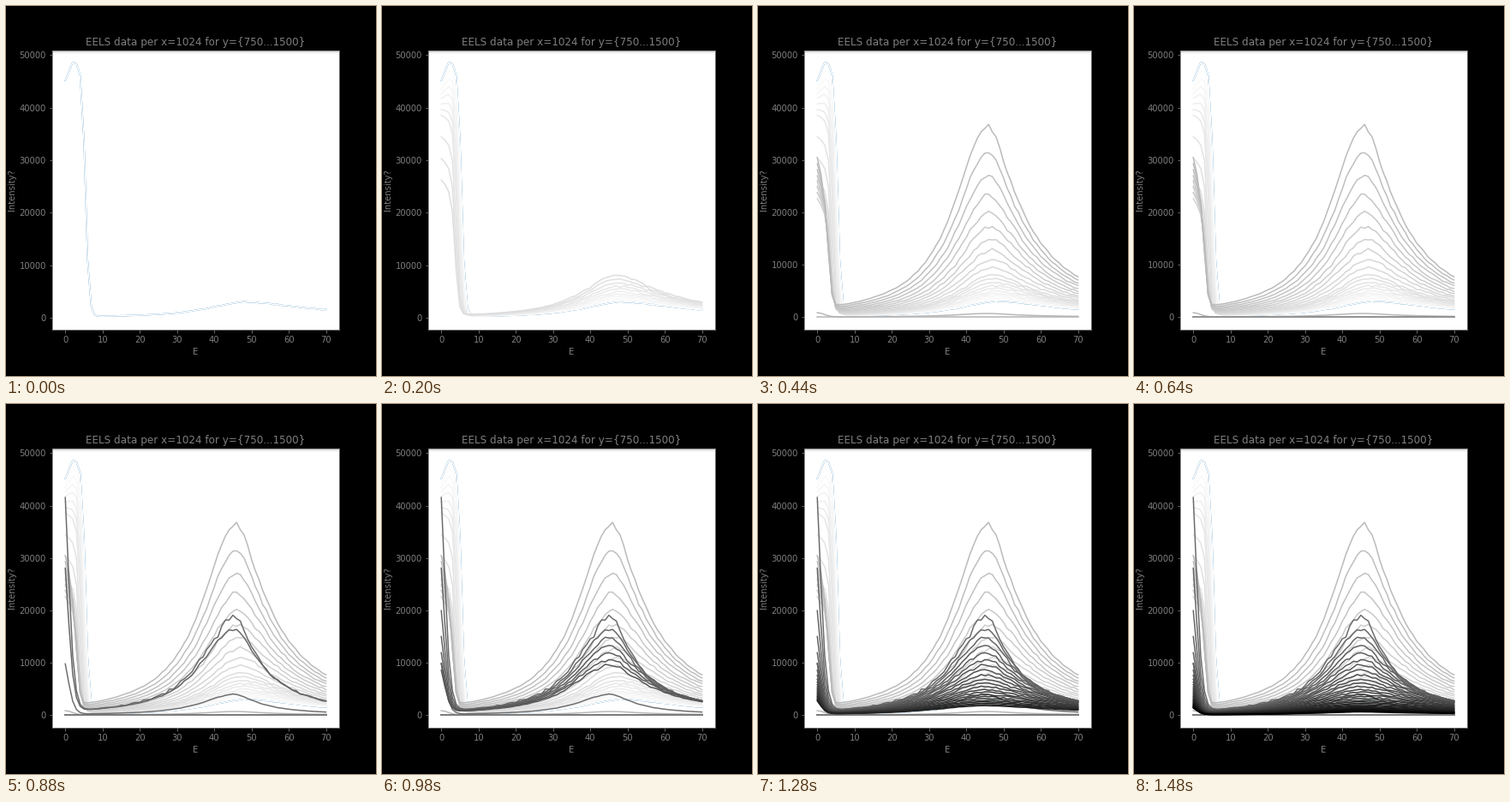
These frames come from a looping animation (432 by 432 pixels, 1500 ms). A matplotlib script:

```python
import matplotlib.pyplot as plt
import numpy as np
from matplotlib.animation import FuncAnimation

N = 75
GAP, BACK = 21, 42  # the signal fades out, then returns
TOP = 48480
GREY = "#7f7f7f"
E = np.arange(71)
rng = np.random.default_rng(4)


def mix(a, b, t):
    return a + (b - a) * np.clip(t, 0, 1)


def hump(center, left, right):
    """Unit peak with its own half-width on each side."""
    d = E - center
    return np.where(d < 0, 1 / (1 + np.abs(d / left) ** 2.1),
                    1 / (1 + np.abs(d / right) ** 1.6))


def jitter(size):
    return 1 + size * rng.standard_normal(E.size)


def early(i):
    """Wide plateau that shrinks while the loss peak grows."""
    t = i / 20
    start = np.interp(i, [0, 4, 7, 10, 13, 20],
                      [45000, 41500, 38200, 25800, 22000, 28800])
    cliff = np.interp(i, [0, 10, 20], [5.4, 3.7, 2.9])
    plateau = 1 + mix(.077, -.2, t) * np.minimum(E, 2) / 2
    edge = start * plateau / (1 + np.exp((E - cliff) / .48))
    peak = np.exp(np.interp(i, [0, 10, 20], np.log([3000, 8100, 36500])))
    shape = hump(mix(49, 46, t), mix(13, 11, t), mix(21, 10.5, t))
    return edge + peak * shape * jitter(mix(.02, .007, t))


def late(i):
    """Sharp spike and loss peak, both decaying."""
    k = i - BACK - 1
    if k < 0:
        start, peak = 9600, 4000
    else:
        start = 30500 * .58 ** k + 10200 * .935 ** k
        peak = 18500 * .895 ** k
    t = k / 20
    shape = hump(45.5, mix(10.5, 17, t), mix(8, 25, t))
    spike = start * np.exp(-(E / 1.6) ** 1.4)
    return spike + peak * shape * jitter(.03 if k == 0 else .015)


def spectrum(i):
    if i < GAP:
        return early(i)
    if i == GAP:
        return 800 * np.exp(-(E / 2.6) ** 2) + 680 * hump(46, 11, 10.5)
    if i < BACK:
        return np.zeros(E.size)
    return late(i)


def shade(i):
    # the flat line darkens in coarse steps
    if GAP + 6 < i < BACK:
        i = min(38, i - (i + 1) % 3)
    return str(1 - i / (N - 1))


fig, ax = plt.subplots(figsize=(6, 6), dpi=72, facecolor="black")
fig.subplots_adjust(left=.125, right=.9, bottom=.125, top=.88)
ax.set_title("EELS data per x=1024 for y={750...1500}", color=GREY)
ax.set_xlabel("E", color=GREY)
ax.set_ylabel("Intensity?", color=GREY)
ax.set_xlim(-3.5, 73.5)
ax.set_xticks(range(0, 71, 10))
ax.set_yticks(range(0, 50001, 10000))
ax.tick_params(color=GREY, labelcolor=GREY)
for spine in ax.spines.values():
    spine.set_color(GREY)

# soft shade under the top edge
for depth in range(1, 4):
    y = 1 - depth / 326
    ax.plot([0, 1], [y, y], transform=ax.transAxes, lw=1,
            color=str(1 - .3 * .45 ** depth))

curves = [spectrum(i) for i in range(N)]
ax.plot(E, curves[0], color="tab:blue", lw=1.5)
lines = [ax.plot(E, y, color=shade(i), lw=1.5)[0] for i, y in enumerate(curves)]


def update(i):
    for j, line in enumerate(lines):
        line.set_visible(j <= i)
    low = 120 if i < GAP else 0
    pad = .05 * (TOP - low)
    ax.set_ylim(low - pad, TOP + pad)
    return lines


anim = FuncAnimation(fig, update, frames=N, init_func=lambda: update(0),
                     interval=20, repeat=True, repeat_delay=0, blit=False)
plt.show()
```
